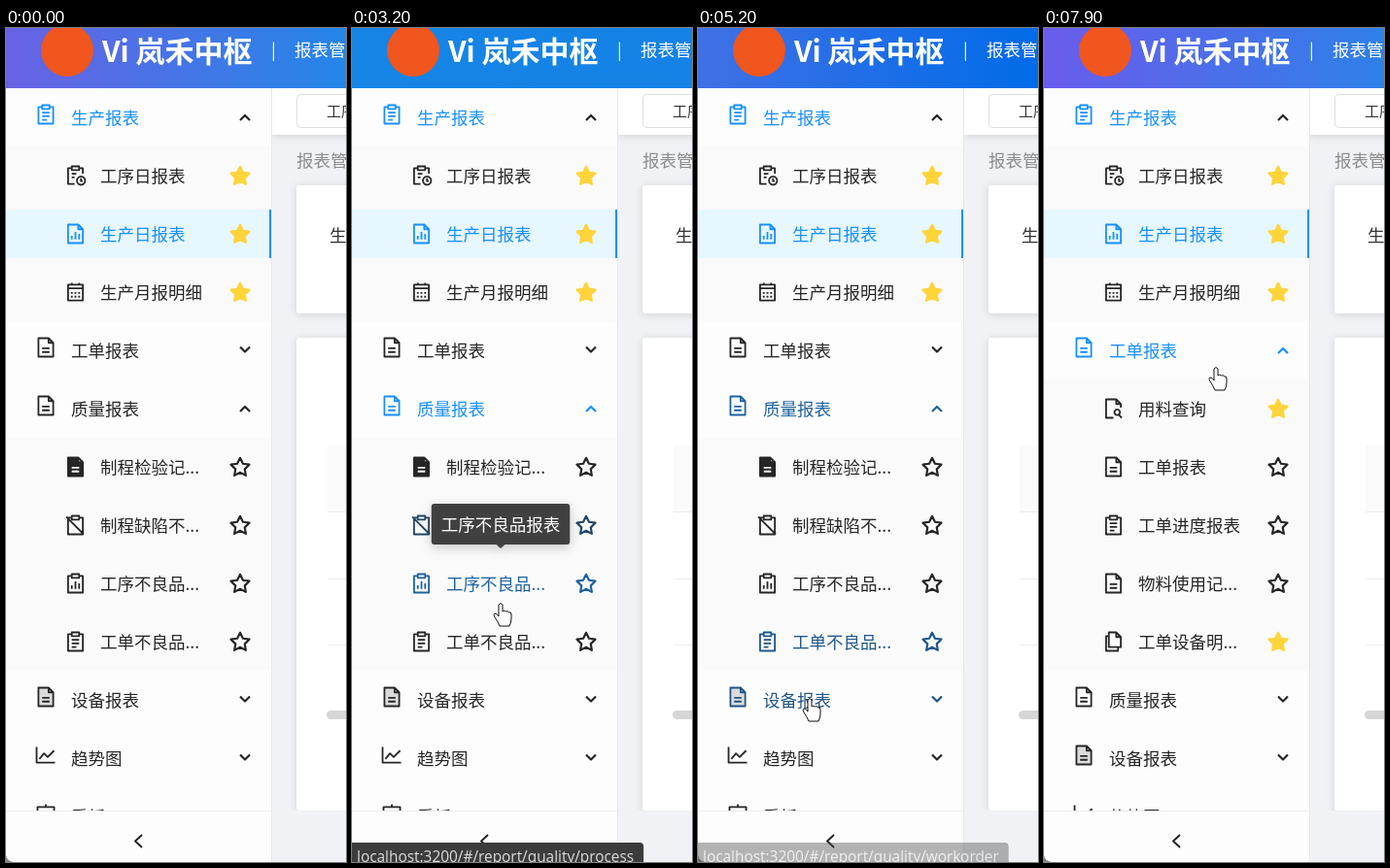
Animation of 350 by 859 pixels, one loop 8000 ms. Source, as an HTML page:

```html
<!DOCTYPE html>
<html lang="zh-CN">
<head>
<meta charset="utf-8">
<style>
html, body { margin: 0; width: 100%; height: 100%; overflow: hidden; background: #f0f2f5; }
svg { display: block; }
text { font: 300 17.5px "Noto Sans CJK SC", "Noto Sans CJK", sans-serif; fill: currentColor; white-space: pre; }
.icon, .line { fill: none; stroke: currentColor; stroke-width: 1.9; stroke-linejoin: round; }
.card { fill: #fff; filter: drop-shadow(0 1px 4px #0002); }
</style>
</head>
<body>
<svg id="stage" width="350" height="859" viewBox="0 0 350 859">
  <defs>
    <linearGradient id="sky"><stop/><stop offset="1"/></linearGradient>
  </defs>
  <rect width="350" height="859" fill="#f0f2f5"/>
  <rect class="card" x="274" y="60" width="90" height="50"/>
  <rect x="299.5" y="68.5" width="70" height="34" rx="4" fill="#fff" stroke="#dedede"/>
  <text x="330" y="91" style="font-size:15px" color="#333">工序日报表</text>
  <text x="299" y="142.5" color="#8c8c8c">报表管理</text>
  <rect class="card" x="299" y="162" width="70" height="132" rx="3"/>
  <text x="333" y="219.5" color="#333">生产</text>
  <rect class="card" x="299" y="319" width="70" height="487" rx="3"/>
  <rect x="274" y="806" width="76" height="53" fill="#f0f2f5"/>
  <rect x="331" y="430" width="40" height="68" fill="#fafafa"/>
  <path d="M331 498.500H350M331 567.500H350M331 635.500H350" stroke="#ececec"/>
  <rect x="330" y="703" width="40" height="9" rx="4.500" fill="#d6d6d6"/>
  <rect width="273" height="859" fill="#fdfdfd"/>
  <path d="M273.500 62V859" stroke="#e6e8ec"/>
  <svg id="menu" width="273" height="806"></svg>
  <path d="M0 806.500H273" stroke="#ececec"/>
  <path class="line" d="M140 831L133 837.500L140 844" color="#222"/>
  <path d="M0 852Q1 858 8 859H0Z" fill="#888"/>
  <rect width="350" height="62" fill="url(#sky)"/>
  <circle cx="63" cy="23" r="27" fill="#f0561d"/>
  <g color="#fff">
    <text x="99" y="34.500" style="font-size:30px;font-weight:700">Vi 岚禾中枢</text>
    <text x="273" y="28.500">|</text>
    <text x="297" y="28.500" style="font-weight:400">报表管理</text>
  </g>
  <g id="tip" style="filter:drop-shadow(0 3px 6px #0003)">
    <rect y="-46" height="42" rx="3" fill="#404040"/>
    <path d="M-5-4.500H5L0 0Z" fill="#404040"/>
    <text y="-18.500" text-anchor="middle" color="#fff"></text>
  </g>
  <g id="status">
    <rect x="-8" y="839" height="30" rx="4" fill="#3c3c3c"/>
    <text x="5" y="858.500" color="#ddd" style="font:15.4px 'Open Sans',sans-serif"></text>
  </g>
  <path id="cursor" fill="#fff" stroke="#111" stroke-linejoin="round"/>
</svg>
<script>
const $ = s => document.querySelector(s);
const clamp = v => Math.max(0, Math.min(1, v));
const mix = (a, b, k) => a.map((v, i) => v + (b[i] - v) * k);
const rgb = c => `rgb(${c.map(Math.round)})`;
const DARK = [38, 38, 38], BLUE = [24, 144, 255];

// Icons, centred on 0,0
const board = 'M-4-8H-8V10H8V-8H4M-4-10H4V-6H-4Z';
const sheet = 'M-8-10H3L8-5V10H-8ZM3-10V-5H8';
const lines = 'M-4 1H4M-4 5H4';
const bars = 'M-4 6V2M0 6V-2M4 6V0';
const icons = {
  clip: board + 'M-4-2H4M-4 2H4M-4 6H1',
  doc: sheet + lines,
  clock: 'M-1 9H-8V-8H-4M4-8H8V-2M-4-10H4V-6H-4ZM-4-2H1M-4 2H-1M6 1a4.500 4.500 0 1 0 .1 0M6 3V6H8',
  chartDoc: sheet + bars,
  calendar: 'M-8-8H8V9H-8ZM-8-4H8M-4-10V-7M4-10V-7M-5 1H-3M-1 1H1M3 1H5M-5 5H-3M-1 5H1M3 5H5',
  solid: sheet,
  noClip: board + 'M-10-9L9 10',
  chartClip: board + bars,
  trend: 'M-10-9V8H10M-7 4L-2-2L2 2L9-5',
  wall: 'M-9-7H9V7H-9ZM0-10V-7' + 'M-4 3V-1M0 3V-3M4 3V0',
  find: 'M0 10H-8V-10H3L8-5V-1M3-10V-5H8M4 1a3 3 0 1 0 .1 0M6 7L9 10',
  pages: 'M-5-10H3L8-5V6H-5ZM3-10V-5H8M-5-6H-8V10H5V6'
};
const star = 'M' + Array.from({ length: 10 }, (_, i) => {
  const a = i * Math.PI / 5, r = i % 2 ? 5 : 10;
  return [(r * Math.sin(a)).toFixed(2), (-r * Math.cos(a)).toFixed(2)];
}).join('L') + 'Z';

// name, icon, items: [name, icon, starred, full name, address]
const sections = [
  ['生产报表', 'clip', [['工序日报表', 'clock', 1], ['生产日报表', 'chartDoc', 1],
    ['生产月报明细', 'calendar', 1, '', 'reportprocessmonth']]],
  ['工单报表', 'doc', [['用料查询', 'find', 1], ['工单报表', 'doc', 0], ['工单进度报表', 'clip', 0],
    ['物料使用记...', 'doc', 0], ['工单设备明...', 'pages', 1]]],
  ['质量报表', 'doc', [['制程检验记...', 'solid', 0, '制程检验记录报表', 'quality/inspection'],
    ['制程缺陷不...', 'noClip', 0, '制程缺陷不良报表', 'quality/defect'],
    ['工序不良品...', 'chartClip', 0, '工序不良品报表', 'quality/process'],
    ['工单不良品...', 'clip', 0, '工单不良品报表', 'quality/workorder']]],
  ['设备报表', 'doc', []], ['趋势图', 'trend', []], ['看板', 'wall', []]
];

// Rows as laid out before the second section opens
const rows = [];
function addRow(row) { rows.push(row); return rows.length - 1; }

function icon(name, x, y, k, fill = '') {
  return `<g transform="translate(${x} ${y}) scale(${k})"><path class="icon" d="${icons[name]}" ${fill}/>` +
    (name === 'solid' ? `<path class="icon" d="${lines}" style="stroke:#fff"/>` : '') + '</g>';
}
function itemMarkup([name, ic, starred], i, id) {
  const y = i * 60 + 30, picked = name === '生产日报表';
  const fill = ic === 'solid' ? 'style="fill:currentColor"' : '';
  return (picked ? `<path d="M0 ${y - 25}h273v50H0Z" fill="#e6f7ff"/><path d="M271 ${y - 25}h2v50h-2Z" fill="#1890ff"/>` : '') +
    `<g data-row="${id}" color="${rgb(picked ? BLUE : DARK)}">${icon(ic, 71.5, y, .95, fill)}` +
    `<text x="97" y="${y + 6.5}">${name}</text>` +
    `<path transform="translate(241 ${y + .8})" d="${star}" stroke-width="2.2" stroke-linejoin="round" ` +
    (starred ? 'fill="#ffd43b" stroke="#ffd43b"' : 'fill="none" stroke="currentColor"') + '/></g>';
}
$('#menu').innerHTML = sections.map(([name, ic, items], s) => {
  const id = addRow({ s, title: true });
  const body = items.map((it, i) =>
    itemMarkup(it, i, s === 1 ? -1 : addRow({ s, tip: it[3], url: it[4] }))).join('');
  return `<g class="section"><g data-row="${id}">` +
    icon(ic, 41, -3, .95, name === '设备报表' ? 'style="fill:#0002"' : '') +
    `<text x="67" y="6.500">${name}</text></g>` +
    `<path class="line arrow" d="M-5 2.500L0-2.500L5 2.500" style="stroke-width:2.2"/>` +
    `<svg y="30" width="273"><rect width="273" height="300" fill="#fafafa"/>${body}</svg></g>`;
}).join('');
const groups = [...document.querySelectorAll('.section')];
const rowNodes = [...document.querySelectorAll('[data-row]')].filter(n => n.dataset.row >= 0);

// Keys: time, then values
function track(keys, t) {
  let i = 1;
  while (i < keys.length - 1 && keys[i][0] < t) i++;
  const a = keys[i - 1], b = keys[i];
  return mix(a, b, clamp((t - a[0]) / (b[0] - a[0]))).slice(1);
}
const path = [[400, 340, 600], [800, 150, 470], [1000, 146, 455], [1550, 148, 450], [1750, 155, 330],
  [1900, 150, 340], [2100, 136, 487], [2300, 146, 512], [2900, 149, 520], [3000, 150, 537], [3040, 151, 549],
  [3200, 153, 592], [3450, 152, 575], [3650, 150, 500], [3800, 148, 455], [4080, 147, 462], [4150, 146, 477],
  [4170, 146, 488], [4300, 145, 490], [4450, 142, 515], [4600, 140, 570], [4750, 130, 610], [4950, 120, 640],
  [5050, 117, 657], [5200, 115, 690], [5400, 112, 720], [5600, 120, 715], [5900, 140, 560], [6200, 160, 350],
  [6400, 165, 262], [6550, 168, 272], [6690, 180, 297], [6740, 187, 309], [6800, 193, 345], [7000, 186, 352],
  [7300, 177, 349], [8000, 177, 349]];
const sky = [[0, 104, 98, 228, 36, 134, 232], [2100, 30, 148, 238, 28, 132, 224], [3200, 22, 133, 230, 20, 130, 230],
  [4300, 24, 96, 220, 0, 118, 240], [5200, 64, 112, 230, 0, 108, 232], [6800, 96, 96, 240, 10, 118, 230],
  [7900, 106, 92, 236, 46, 128, 232]];

function hit([x, y]) {
  const slot = x < 273 && y < 806 ? Math.floor((y - 62) / 60) : -1;
  return { sec: slot < 0 ? -1 : rows[slot].s, row: slot >= 0 && Math.abs(y - 92 - slot * 60) < 25 ? slot : -1 };
}

// Replays hovering up to time t so that every fade follows from the path
function hovering(t) {
  const glow = rows.map(() => 0), tips = rows.map(() => 0);
  let last = -1, age = 0, url = '', idle = 1000;
  for (let s = path[0][0]; s <= t; s += 10) {
    const { sec, row } = hit(track(path, s));
    age = row === last ? age + 10 : 0;
    last = row;
    rows.forEach((r, i) => {
      glow[i] = clamp(glow[i] + (i === row || r.title && r.s === sec ? 1 : -1) / 30);
      tips[i] = clamp(tips[i] + (i === row && age > 70 && r.tip ? 1 : -1) / 8);
    });
    idle += 10;
    if (row >= 0 && rows[row].url && age > 70) { url = rows[row].url; idle = 0; }
  }
  return { glow, tips, url, row: last, shown: clamp(1 - (idle - 110) / 80) };
}

function draw(t) {
  const { glow, tips, url, row, shown } = hovering(t);

  const c = track(sky, t), stops = document.querySelectorAll('#sky stop');
  stops[0].setAttribute('stop-color', rgb(c.slice(0, 3)));
  stops[1].setAttribute('stop-color', rgb(c.slice(3)));

  const k = clamp((t - 7400) / 300), p = k * k * (3 - 2 * k);
  const open = [1, p, 1 - p, 0, 0, 0];
  let y = 92;
  groups.forEach((g, s) => {
    const h = sections[s][2].length * 60 * open[s], arrow = g.querySelector('.arrow');
    g.setAttribute('transform', `translate(0 ${y})`);
    g.querySelector('svg').setAttribute('height', h);
    arrow.setAttribute('transform', `translate(246 ${s < 3 && open[s] ? .5 : -1}) scale(1 ${2 * open[s] - 1})`);
    arrow.setAttribute('color', rgb(mix(DARK, BLUE, glow[rows.findIndex(r => r.s === s)])));
    y += 60 + h;
  });
  rowNodes.forEach(n => {
    const i = +n.dataset.row;
    n.setAttribute('color', rgb(mix(DARK, BLUE, i === 0 || i === 2 ? 1 : glow[i])));
  });

  const top = tips.indexOf(Math.max(...tips)), a = tips[top], tip = $('#tip');
  tip.setAttribute('opacity', a);
  if (a) {
    const name = rows[top].tip, w = name.length * 17.5 + 20, box = tip.querySelector('rect');
    tip.querySelector('text').textContent = name;
    box.setAttribute('x', -w / 2);
    box.setAttribute('width', w);
    tip.setAttribute('transform', `translate(153 ${92 + top * 60 - 36}) scale(${.8 + .2 * a})`);
  }

  const label = $('#status text');
  label.textContent = 'localhost:3200/#/report/' + url;
  $('#status rect').setAttribute('width', label.getComputedTextLength() + 23);
  $('#status').setAttribute('opacity', shown);

  const [x, cy] = track(path, t), cursor = $('#cursor');
  cursor.setAttribute('opacity', t < path[0][0] ? 0 : 1);
  cursor.setAttribute('transform', `translate(${x} ${cy})`);
  cursor.setAttribute('d', row >= 0
    ? 'M-2 2Q0-1 2 2V9Q4 7 5.500 9Q8 8 8.500 10Q11 9 11 12V16Q11 20 9 24H-1Q-3 19-6 15Q-8 12-6 11Q-4 10.500-2 14Z'
    : 'M0 0V17L4 13.500L6.500 19.500L9 18.500L6.500 12.500H12Z');
}

const start = performance.now();
let shownAt = -1;
function frame(now) {
  const t = Math.floor(Math.max(0, now - start) % 8000 / 100) * 100;
  if (t !== shownAt) draw(shownAt = t);
  requestAnimationFrame(frame);
}
draw(0);
requestAnimationFrame(frame);
</script>
</body>
</html>
```
